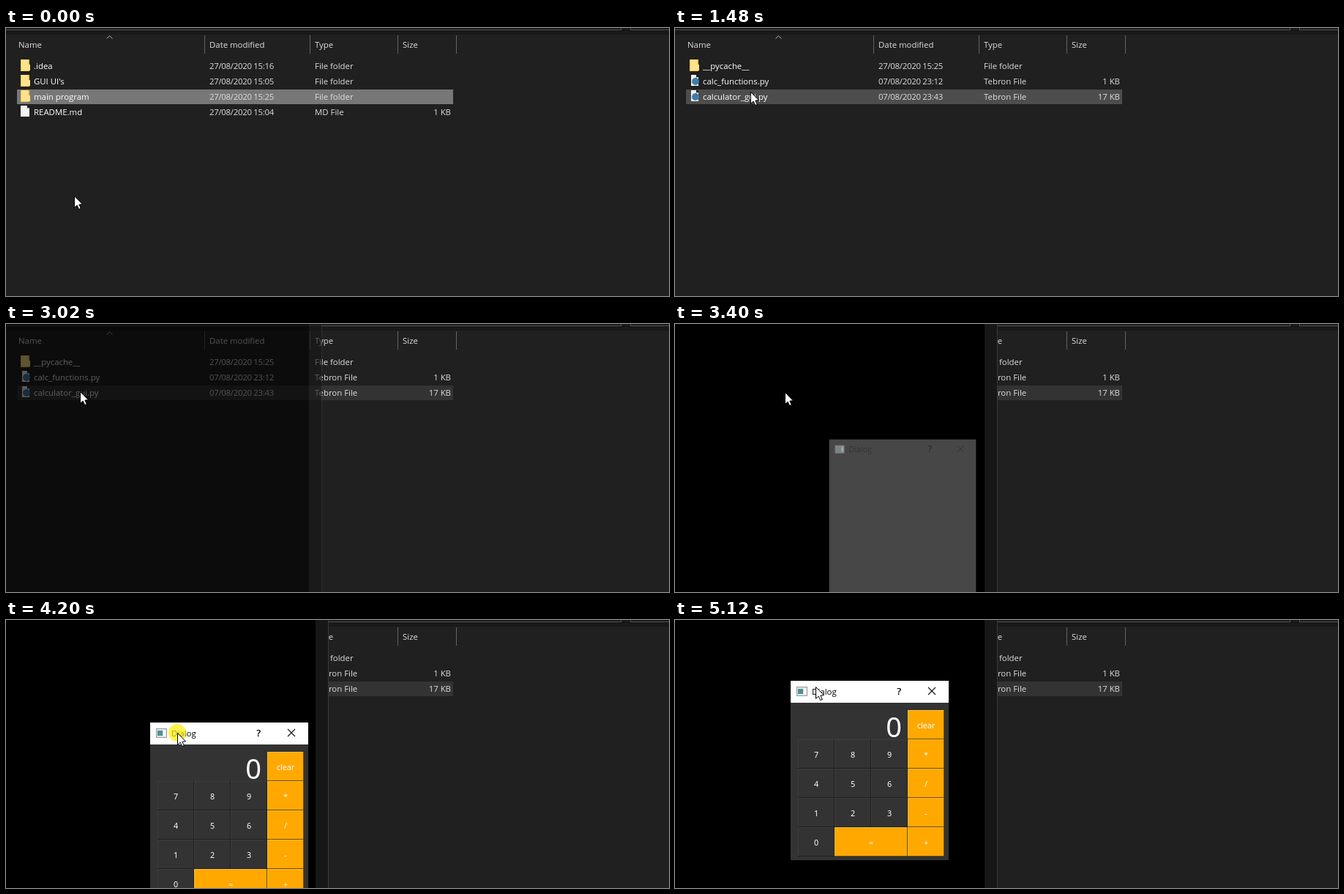
Animation of 906 by 366 pixels, one loop 5.19 s. Source, as an HTML page with a canvas:

```html
<!DOCTYPE html>
<html lang="en">
<head>
<meta charset="utf-8">
<title>Opening a calculator</title>
<style>
  html, body { margin: 0; width: 100%; height: 100%; overflow: hidden; background: #202020; }
  canvas { display: block; }
</style>
</head>
<body>
<canvas id="stage" width="906" height="366"></canvas>
<script>
const ctx = document.getElementById('stage').getContext('2d');
const LOOP = 5190;
const STEP = LOOP / 67;
const STEP_LEAD = 8;
const UI = '"Open Sans", "Noto Sans", sans-serif';
const PAD = '"Noto Sans", "Open Sans", sans-serif';
const SOFT = '#dedede';

// Scene changes in ms
const OPEN_FOLDER = 1390, SELECT = 2085, CONSOLE = 3010, DIALOG = 3400, PAINTED = 3630;
const GRAB = 4050, RELEASE = 4995;

const home = { x: 93, y: 229 };
const grip = { x: 240, y: 163 };

// Each move starts where the one before ended; bow bends it to the right
const moves = [
  { from: 0, to: 530, x: 103, y: 99, bow: 30 },
  { from: 530, to: 680, x: 103, y: 83 },
  { from: 1000, to: 1080, x: 103, y: 87 },
  { from: 1700, to: 1860, x: 101, y: 80 },
  { from: 2010, to: 2085, x: 101, y: 87 },
  { from: 2110, to: 2320, x: 101, y: 92 },
  { from: 3100, to: 3400, x: 150, y: 93 },
  { from: 3570, to: 3990, ...grip },
  { from: GRAB, to: RELEASE, x: 195, y: 97 },
  { from: RELEASE, to: 5100, x: 192, y: 91 }
];
const presses = [[1300, 1400], [2550, 2630], [2705, 2780], [GRAB - 30, RELEASE]];

const folder = (name, time) => ['folder', name, `27/08/2020 ${time}`, 'File folder', ''];
const script = (name, time, size) => ['script', name, `07/08/2020 ${time}`, 'Tebron File', size];
const projectRows = [
  folder('.idea', '15:16'),
  folder("GUI UI's", '15:05'),
  folder('main program', '15:25'),
  ['page', 'README.md', '27/08/2020 15:04', 'MD File', '1 KB']
];
const programRows = [
  folder('__pycache__', '15:25'),
  script('calc_functions.py', '23:12', '1 KB'),
  script('calculator_gui.py', '23:43', '17 KB')
];

const clamp = v => Math.max(0, Math.min(1, v));

function cursorAt(t) {
  let { x, y } = home;
  for (const m of moves) {
    const p = clamp((t - m.from) / (m.to - m.from));
    x += (m.x - x) * p + (m.bow || 0) * Math.sin(Math.PI * p);
    y += (m.y - y) * p;
    if (p < 1) break;
  }
  return { x: Math.round(x), y: Math.round(y) };
}

function rect(color, x, y, w, h) {
  ctx.fillStyle = color;
  ctx.fillRect(x, y, w, h);
}

function text(str, x, y, { color = '#fff', size = 11.4, align = 'left', family = UI, spacing = 0 } = {}) {
  ctx.font = `${size}px ${family}`;
  ctx.letterSpacing = spacing + 'px';
  ctx.textAlign = align;
  ctx.fillStyle = color;
  ctx.fillText(str, x, y);
}

function line(color, width, ...pts) {
  ctx.strokeStyle = color;
  ctx.lineWidth = width;
  ctx.beginPath();
  pts.forEach(([x, y]) => ctx.lineTo(x, y));
  ctx.stroke();
}

function disc(color, x, y, r) {
  ctx.fillStyle = color;
  ctx.beginPath();
  ctx.arc(x, y, r, 0, Math.PI * 2);
  ctx.fill();
}

function icon(kind, y) {
  if (kind === 'folder') {
    rect('#f5cb55', 20, y - 8, 12, 16);
    rect('#ffe28c', 21, y - 8, 9, 15);
    rect('#ffe28c', 30, y - 1, 3, 8);
    return;
  }
  const x = kind === 'script' ? 22 : 20;
  const w = 32 - x;
  rect('#f4f4f4', x, y - 8, w, 15);
  rect('#202020', x + w - 3, y - 8, 3, 3);
  rect('#bdbdbd', x + w - 4, y - 5, 4, 1);
  if (kind === 'script') disc('#3f7cac', 28, y + 1, 5);
}

function addressBar(x, w, edge) {
  rect('#535353', x, 2, w, 1);
  rect('#535353', edge, 0, 1, 3);
}

function explorer(t, cursor) {
  rect('#202020', 0, 0, 906, 366);
  rect('#191919', 0, 0, 906, 9);
  addressBar(0, 841, 840);
  addressBar(853, 53, 853);

  for (const x of [271, 415, 535, 615]) rect('#636363', x, 10, 1, 25);
  line('#b0b0b0', 1, [137.5, 14.5], [141.5, 10.8], [145.5, 14.5]);
  [['Name', 17], ['Date modified', 278], ['Type', 422], ['Size', 542]]
    .forEach(([label, x]) => text(label, x, 27, { color: SOFT }));

  const inside = t >= OPEN_FOLDER;
  const focused = t < CONSOLE;
  const selected = !inside || t >= SELECT ? 2 : -1;
  const hovered = focused ? Math.floor((cursor.y - 41) / 21) : -1;

  (inside ? programRows : projectRows).forEach(([kind, name, date, type, size], i) => {
    const y = 51 + i * 21;
    const fill = i === selected ? (focused ? '#777' : '#333') : i === hovered ? '#4d4d4d' : null;
    if (fill) rect(fill, 15, y - 9, 596, 20);
    icon(kind, y);
    text(name, 38, y + 5);
    text(date, 278, y + 5, { color: SOFT, spacing: -0.28 });
    text(type, 422, y + 5, { color: SOFT });
    text(size, 608, y + 5, { color: SOFT, align: 'right' });
  });
}

function consoleWindow(t) {
  const p = clamp((t - CONSOLE) / 150);
  const right = Math.round(430 + 11 * p * (2 - p));
  ctx.globalAlpha = 0.6 + 0.4 * p;
  rect('#000', 0, 0, right - 18, 366);
  rect('#171717', right - 18, 0, 17, 366);
  rect('#3a3a3a', right - 1, 0, 1, 366);
  ctx.globalAlpha = 1;
}

function key(label, col, row, span = 1) {
  const x = 10 + col * 50, y = 40 + row * 40, w = span * 50;
  const orange = isNaN(label);
  rect(orange ? '#6e4a05' : '#1f1f1f', x, y, w, 40);
  rect(orange ? '#ffbe3c' : '#3d3d3d', x, y, w - 1, 39);
  rect(orange ? '#ffa800' : '#333', x + 1, y + 1, w - 2, 38);
  text(label, x + w / 2, y + 25, { size: 10.8, align: 'center', family: PAD });
}

function keypad() {
  rect('#333', 0, 30, 216, 215);
  text('0', 141, 77, { size: 38, align: 'center', family: PAD });
  for (let d = 1; d <= 9; d++) key(String(d), (d - 1) % 3, 3 - Math.floor((d - 1) / 3));
  ['clear', '*', '/', '-', '+'].forEach((label, row) => key(label, 3, row));
  key('0', 0, 4);
  key('=', 1, 4, 2);
}

function titleBar() {
  rect('#8f9a9c', 8, 8, 15, 13);
  rect('#e4e6e8', 9, 9, 13, 11);
  rect('#4f8f96', 10, 11, 7, 7);
  rect('#fafafa', 18, 11, 3, 7);
  text('Dialog', 29, 19, { color: '#000', size: 11.5 });
  for (const x of [148, 148.4]) text('?', x, 19, { color: '#000', size: 13, align: 'center' });
  line('#111', 1.1, [188, 9], [198, 19]);
  line('#111', 1.1, [198, 9], [188, 19]);
}

function dialog(t) {
  // Follows the cursor while its title bar is held
  const held = cursorAt(Math.max(GRAB, Math.min(RELEASE, t)));
  const painted = t >= PAINTED;
  ctx.save();
  ctx.translate(203 + held.x - grip.x, 149 + held.y - grip.y);
  if (!painted) {
    const p = clamp((t - DIALOG + 50) / 200);
    const scale = 0.9 + 0.1 * p;
    ctx.globalAlpha = 0.96 * p;
    ctx.translate(108 * (1 - scale), 122 * (1 - scale));
    ctx.scale(scale, scale);
  }
  rect('#fff', 0, 0, 216, 245);
  titleBar();
  if (painted) keypad();
  ctx.restore();
}

function pointer({ x, y }) {
  ctx.save();
  ctx.translate(x + 0.5, y + 0.5);
  ctx.beginPath();
  [[0, 0], [0, 16], [3.6, 12.6], [6.2, 18], [8.8, 17], [6.4, 11.6], [11, 11.3]]
    .forEach(([px, py]) => ctx.lineTo(px, py));
  ctx.closePath();
  ctx.fillStyle = '#fff';
  ctx.fill();
  ctx.strokeStyle = '#000';
  ctx.lineWidth = 1;
  ctx.stroke();
  ctx.restore();
}

function draw(now) {
  // The screen refreshes in even steps
  const t = Math.floor((now + STEP_LEAD) / STEP) * STEP % LOOP;
  const cursor = cursorAt(t);
  explorer(t, cursor);
  if (t >= CONSOLE) consoleWindow(t);
  if (t >= DIALOG) dialog(t);
  if (presses.some(([down, up]) => t >= down && t < up))
    disc('rgba(255, 236, 0, 0.7)', cursor.x, cursor.y, 12);
  pointer(cursor);
}

const start = performance.now();
function loop() {
  draw((performance.now() - start) % LOOP);
  requestAnimationFrame(loop);
}
loop();
</script>
</body>
</html>
```
